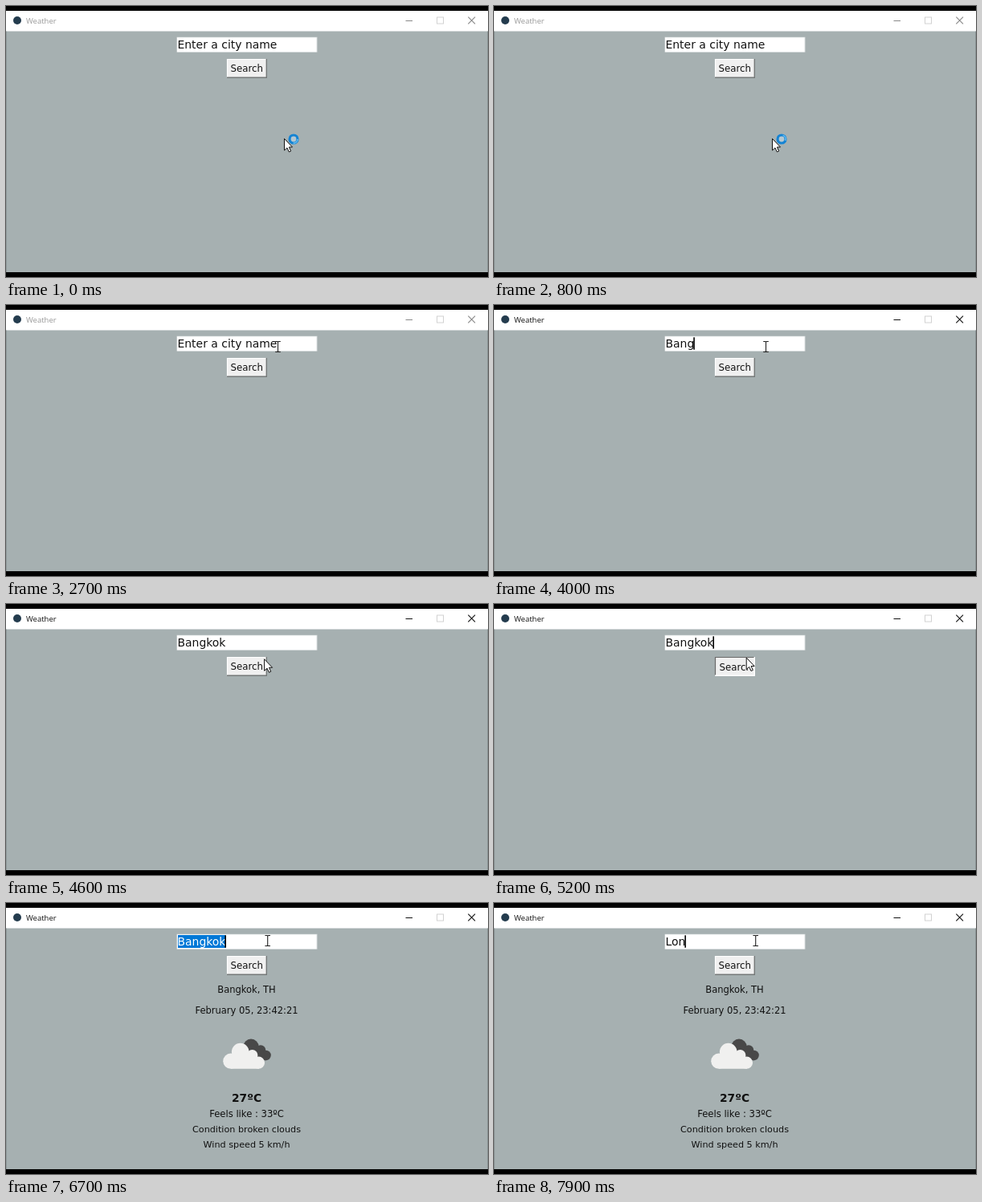
Animation of 600 by 338 pixels, one loop 8000 ms. Source, as an HTML page:

```html
<!DOCTYPE html>
<html lang="en">
<head>
<meta charset="utf-8">
<title>Weather</title>
<style>
html, body { margin: 0; width: 100%; height: 100%; overflow: hidden; background: #000; }
svg { display: block; width: 100%; height: 100%; }
text { font-family: "DejaVu Sans", sans-serif; fill: #111; white-space: pre; }
.mid { text-anchor: middle; }
#title { font-family: "Open Sans", sans-serif; font-size: 9.5px; }
#entry { font-size: 13.93px; }
</style>
</head>
<body>
<svg viewBox="0 0 600 338" preserveAspectRatio="none">
  <rect width="600" height="338"/>
  <rect y="6" width="600" height="326" fill="#a6b0b1"/>
  <rect y="6" width="600" height="25.5" fill="#fff"/>
  <path d="M.3 31.5V332M599.6 31.5V332" stroke="#7d8687" stroke-width=".7"/>

  <circle cx="14" cy="18" r="5" fill="#243c4e"/>
  <text id="title" x="25" y="22">Weather</text>
  <g id="controls" fill="none">
    <path d="M497.5 18.5H506M575.3 13.7L584 22.4M584 13.7L575.3 22.4" stroke-width="1.1"/>
  </g>
  <rect x="536.5" y="14" width="8" height="8" fill="none" stroke="#d2d2d2"/>

  <rect x="212.5" y="38.7" width="175" height="19" fill="#d5dadb"/>
  <rect x="213" y="39.3" width="173.6" height="18" fill="#fff"/>
  <rect id="mark" x="214" y="40" width="59.5" height="16" fill="#0078d7"/>
  <text id="entry" x="213.5" y="53"></text>
  <rect id="caret" y="40.3" width="1.6" height="15.4" fill="#000"/>

  <rect x="275" y="66" width="50" height="24" fill="#f0f0f0"/>
  <path id="edgeTop" d="M275.5 89.5V66.5H324.5" fill="none" stroke-width="1.2"/>
  <path id="edgeLow" d="M275 89.3H324.3V66" fill="none" stroke-width="1.4"/>
  <text id="label" class="mid" font-size="11.75">Search</text>

  <g id="result">
    <g fill="#484848">
      <circle cx="305" cy="179.3" r="9.7"/>
      <circle cx="317" cy="183.5" r="6.2"/>
      <circle cx="323.6" cy="190" r="6.2"/>
      <path d="M300 184H320L324 196.2H300Z"/>
    </g>
    <g fill="#f0f0ef">
      <circle cx="291.7" cy="185.6" r="10.8"/>
      <circle cx="279.8" cy="197.2" r="9.6"/>
      <circle cx="306.5" cy="190" r="6.9"/>
      <circle cx="314.4" cy="199.2" r="7.6"/>
      <path d="M280 192L292 186H308L315 194V206.8H280Z"/>
    </g>
  </g>

  <g id="arrow">
    <path d="M.5.5V15L4 11.9L6.3 17L8.6 16L6.4 11H10.5Z" fill="#fff" stroke="#111" stroke-width="1" stroke-linejoin="round"/>
    <g id="busy" transform="translate(12 1)" fill="none">
      <circle r="6.5" fill="#b5c7d1"/>
      <circle r="5" stroke="#1583d2" stroke-width="3.2"/>
      <circle id="arc" r="5" stroke="#5fb8ee" stroke-width="1.8" stroke-dasharray="8 24"/>
    </g>
  </g>
  <path id="beam" d="M-3.3 -6.5H-1Q0 -6.5 0 -5.6Q0 -6.5 1 -6.5H3.3M0 -5.6V5.6M-3.3 6.5H-1Q0 6.5 0 5.6Q0 6.5 1 6.5H3.3" fill="none" stroke="#222" stroke-width="1.1"/>
</svg>
<script>
const LOOP = 8000, STEP = 100;
const $ = id => document.getElementById(id);
const show = (id, on) => $(id).setAttribute("visibility", on ? "inherit" : "hidden");
const set = (id, attrs) => { for (const k in attrs) $(id).setAttribute(k, attrs[k]); };

// Result lines: text, baseline, size, weight
for (const [text, y, size, weight] of [
  ["Bangkok, TH", 112, 11.5, 400],
  ["February 05, 23:42:21", 138, 11.5, 400],
  ["27ºC", 247.7, 13.8, 700],
  ["Feels like : 33ºC", 266.7, 11.6, 400],
  ["Condition broken clouds", 285.7, 11.2, 400],
  ["Wind speed 5 km/h", 304.5, 11.2, 400]
]) {
  const el = document.createElementNS("http://www.w3.org/2000/svg", "text");
  el.textContent = text;
  el.setAttribute("class", "mid");
  el.setAttribute("x", 299.5);
  el.setAttribute("y", y);
  el.setAttribute("font-size", size);
  el.setAttribute("font-weight", weight);
  $("result").append(el);
}

// Each entry applies from its time on
const typed = [
  [0, "Enter a city name"], [2800, ""],
  [3100, "B"], [3300, "Ba"], [3500, "Ban"], [3700, "Bang"],
  [4200, "Bangk"], [4300, "Bangko"], [4500, "Bangkok"],
  [7500, "L"], [7800, "Lo"], [7900, "Lon"]
];
// Pointer stops: time, x, y
const stops = [
  [0, 346, 165], [2100, 346, 165], [2500, 338.5, 52], [4400, 338.5, 52],
  [4700, 315, 74], [4900, 315, 74], [5000, 313.7, 66.5],
  [5300, 313.7, 66.5], [5600, 325.7, 47], [LOOP, 325.7, 47]
];

function pointer(t) {
  const i = stops.findIndex(s => s[0] > t);
  const [t0, x0, y0] = stops[i - 1], [t1, x1, y1] = stops[i];
  const p = (t - t0) / (t1 - t0), e = p * p * (3 - 2 * p);
  return [x0 + (x1 - x0) * e, y0 + (y1 - y0) * e];
}

// 600 ms on, 300 ms off
const caretOn = t => t >= 2800 && (t - 3000 + 900) % 900 < 600;

function draw(t) {
  const active = t >= 2800;
  set("title", { style: "fill:" + (active ? "#111" : "#999") });
  set("controls", { stroke: active ? "#111" : "#888" });

  const marked = t >= 6600 && t < 7500;
  $("entry").textContent = typed.filter(s => s[0] <= t).pop()[1];
  set("entry", { style: "fill:" + (marked ? "#fff" : "#111") });
  show("mark", marked);
  show("caret", caretOn(t));
  set("caret", { x: 213.1 + $("entry").getComputedTextLength() - .6 });

  const down = t >= 5000 && t < 5300;
  set("edgeTop", { stroke: down ? "#696969" : "#fff" });
  set("edgeLow", { stroke: down ? "#fff" : "#747878" });
  set("label", { x: down ? 300.7 : 299.7, y: down ? 83 : 82 });
  show("result", t >= 5600);

  const [x, y] = pointer(t);
  const inEntry = x > 213 && x < 387 && y > 39 && y < 58;
  show("arrow", !inEntry);
  show("beam", inEntry);
  show("busy", t < 900);
  set("arrow", { transform: `translate(${x} ${y})` });
  set("beam", { transform: `translate(${x} ${y})` });
  set("arc", { transform: `rotate(${t * .36})` });
}

const start = performance.now();
function tick() {
  const t = (performance.now() - start) % LOOP;
  draw(Math.floor(t / STEP) * STEP);
  requestAnimationFrame(tick);
}
tick();
</script>
</body>
</html>
```
